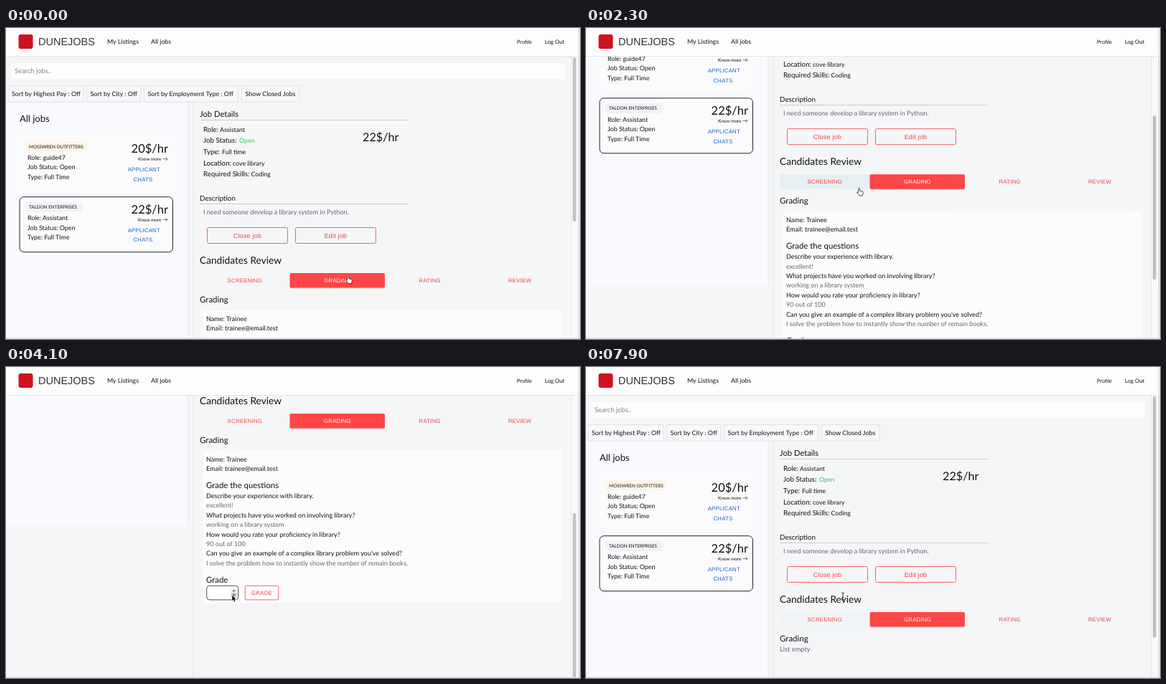
An HTML page for the animation above (8000 ms loop, 800 px wide and 434 px high).

```html
<!DOCTYPE html>
<html lang="en">
<head>
<meta charset="utf-8">
<title>Job board</title>
<style>
  html, body { margin: 0; width: 100%; height: 100%; overflow: hidden; background: #f5f6f8; }
  svg { display: block; width: 100vw; height: 100vh; }
  text { font-family: Lato, sans-serif; fill: #111; text-rendering: geometricPrecision; white-space: pre; }
  .ui { font-family: "Liberation Sans", Arial, sans-serif; letter-spacing: .0286em; text-anchor: middle; }
  .brand { font-family: "Liberation Sans", Arial, sans-serif; fill: #333; }
  .red { fill: #ef4040; }
  .blue { fill: #1866c0; }
  .white { fill: #fff; }
  .gray { fill: #5f656e; }
  .hint { fill: #7b8088; }
  .green { fill: #2fc45a; }
  .end { text-anchor: end; }
  .outline { fill: none; stroke: #f26464; }
  .rule { stroke: #c8cbce; }
  .edge { stroke: #e3e5e8; }
</style>
</head>
<body>
<svg id="stage" viewBox="0 0 800 434" preserveAspectRatio="none"></svg>
<script>
const text = (x, y, size, value, cls = "") =>
  `<text x="${x}" y="${y}" font-size="${size}" class="${cls}">${value}</text>`;
const rect = (x, y, w, h, attrs) =>
  `<rect x="${x}" y="${y}" width="${w}" height="${h}" ${attrs}/>`;
const line = (x1, y1, x2, y2, cls) =>
  `<line x1="${x1}" y1="${y1}" x2="${x2}" y2="${y2}" class="${cls}"/>`;

const filterBox = (x, w, label) =>
  rect(x, 80.5, w, 22.5, 'fill="#f7f8f9" stroke="#e1e3e6"') + text(x + 5, 95, 8.9, label);

const jobCard = (y, company, pillWidth, pillFill, role, pay, stroke) =>
  `<g transform="translate(0 ${y})">` +
  rect(19, 0.5, 213.5, 77, `rx="6" fill="#fbfbfc" stroke="${stroke}"`) +
  rect(26, 7.5, pillWidth, 14.5, `rx="7.2" fill="${pillFill}"`) +
  text(32, 17.1, 6.33, company) +
  text(226, 23.8, 16.5, pay, "end") +
  text(184, 34.5, 6.4, "Know more") +
  '<path d="M218.5 32.2h6.5m-2.3-2.2l2.3 2.2l-2.3 2.2" fill="none" stroke="#333" stroke-width=".7"/>' +
  text(30, 33.3, 8.8, "Role: " + role) +
  text(30, 46.8, 8.95, "Job Status: Open") +
  text(30, 60.2, 8.9, "Type: Full Time") +
  text(192.3, 49.5, 7.8, "APPLICANT", "ui blue") +
  text(191, 63.3, 7.8, "CHATS", "ui blue") + "</g>";

const detail = (y, label, valueX, value, cls) =>
  text(275, y, 9.75, label) + text(valueX, y, 8.8, value, cls);

const questions = [
  ["Describe your experience with library.", "excellent!"],
  ["What projects have you worked on involving library?", "working on a library system"],
  ["How would you rate your proficiency in library?", "90 out of 100"],
  ["Can you give an example of a complex library problem you've solved?",
   "I solve the problem how to instantly show the number of remain books."],
].flat();

const page =
  rect(0, 104, 254, 394, 'fill="#f8fafd"') +
  line(254, 104, 254, 498, "edge") + line(261, 104, 261, 800, "edge") +
  rect(7, 49, 772, 22, 'fill="#fcfdfd"') + text(12, 63, 9.3, "Search jobs..", "hint") +
  filterBox(3, 105, "Sort by Highest Pay : Off") +
  filterBox(112.5, 75, "Sort by City : Off") +
  filterBox(192.5, 131, "Sort by Employment Type : Off") +
  filterBox(328.5, 80.5, "Show Closed Jobs") +
  text(19, 131, 13, "All jobs") +
  jobCard(150.5, "MOSSWREN OUTFITTERS", 87, "#fdf4e6", "guide47", "20$/hr", "none") +
  jobCard(235.2, "TALDON ENTERPRISES", 82, "#eff2f6", "Assistant", "22$/hr", "#222") +

  text(270, 124.3, 11.2, "Job Details") + line(270, 128.5, 560, 128.5, "rule") +
  detail(144.7, "Role:", 298, "Assistant") +
  detail(160.2, "Job Status:", 325, "Open", "green") +
  detail(176, "Type:", 301, "Full time") +
  detail(191.6, "Location:", 316, "cove library") +
  detail(207.3, "Required Skills:", 341.5, "Coding") +
  text(497, 158.2, 16.2, "22$/hr") +
  text(270, 241, 9.8, "Description") + line(270, 245.5, 560, 245.5, "rule") +
  text(275, 260, 9.03, "I need someone develop a library system in Python.", "gray") +
  rect(280.5, 278.5, 112, 22, 'rx="2" class="outline"') + text(336.5, 292.8, 8.9, "Close job", "ui red") +
  rect(403.5, 278.5, 112, 22, 'rx="2" class="outline"') + text(459.5, 292.8, 8.9, "Edit job", "ui red") +
  text(270, 329, 13.7, "Candidates Review") +
  rect(270, 342, 126, 20.5, 'id="tabHover" rx="2" fill="#e6eff2"') +
  rect(396, 343.5, 132, 20.3, 'rx="2" fill="#000" opacity=".14"') +
  rect(395.5, 342, 132.5, 20.6, 'rx="2" fill="#fe4646"') +
  text(332.8, 355, 7.8, "SCREENING", "ui red") + text(462, 355, 7.8, "GRADING", "ui white") +
  text(590.7, 355, 7.8, "RATING", "ui red") + text(716, 355, 7.8, "REVIEW", "ui red") +
  text(270, 383.3, 11.5, "Grading") +

  '<g id="form">' +
  rect(274.5, 394, 500, 212, 'rx="4" fill="#fcfcfd"') +
  text(279, 408.5, 9.1, "Name: Trainee") + text(279, 422, 9.1, "Email: trainee@email.test") +
  text(279, 446, 11.4, "Grade the questions") +
  questions.map((q, i) => text(279, 460 + i * 13.4, 9.05, q, i % 2 ? "gray" : "")).join("") +
  text(279, 578, 11.4, "Grade") +
  rect(279.7, 582.3, 44, 19.6, 'id="field" rx="4" fill="#fff"') +
  text(313, 595.4, 8.9, "", "end value") +
  rect(313.2, 587, 0.8, 10, 'id="caret" fill="#111"') +
  '<g id="spinner">' + rect(313.8, 586, 7.6, 12.5, 'rx="1" fill="#ececec"') +
  rect(313.8, 592.3, 7.6, 6.2, 'id="spinDown" rx="1" fill="#c9c9c9"') +
  '<path d="M315.8 590.3l1.8-2.3l1.8 2.3zM315.8 594.4l1.8 2.3l1.8-2.3z" fill="#444"/></g>' +
  rect(333.2, 582.3, 46.6, 19.6, 'id="gradeHover" rx="2" fill="#fdecec"') +
  rect(333.2, 582.3, 46.6, 19.6, 'rx="2" class="outline"') +
  text(356.5, 594.9, 7.8, "GRADE", "ui red") + "</g>" +
  text(270, 397.3, 9.3, "List empty", "gray empty");

const header =
  rect(0, 0, 800, 39.5, 'fill="#fdfdfd"') + line(0, 39.5, 796, 39.5, "edge") +
  rect(17.5, 9, 20, 20, 'rx="3" fill="#d0121f"') +
  text(45, 24.3, 14.5, "DUNEJOBS", "brand") +
  text(141, 22.3, 8.85, "My Listings") + text(202, 22.3, 8.75, "All jobs") +
  text(712, 22, 7.4, "Profile") + text(751, 22, 7.75, "Log Out");

const pointers = {
  arrow: '<path d="M0 0v8.6l2-1.8l1.5 3.2l1.5-.7l-1.4-3.1h2.6z" fill="#000" stroke="#fff" stroke-width=".6"/>',
  hand: '<path d="M-.9 .9q.9-1.4 1.8 0v3.2l3.9 .9q1.2 .4 1 1.8l-.8 4.2h-4.4l-3.4-4.2q-.1-1.6 1.9-.2z" fill="#fff" stroke="#222" stroke-width=".8"/>',
  beam: '<path d="M-2-5q2 0 2 1.4q0-1.4 2-1.4M0-3.6v7.2M-2 5q2 0 2-1.4q0 1.4 2 1.4M-1.2 1.5h2.4" fill="none" stroke="#222" stroke-width=".9"/>',
};

const stage = document.getElementById("stage");
stage.innerHTML =
  rect(0, 0, 800, 434, 'fill="#f5f6f8"') + `<g id="page">${page}</g>` +
  rect(788, 40, 9, 394, 'fill="#fafafa"') + line(788, 40, 788, 434, "edge") +
  rect(790, 41, 4.6, 229, 'id="thumb" rx="2.3" fill="#c1c1c1"') + header +
  line(798.5, 0, 798.5, 434, "rule") + line(0, 433.3, 800, 433.3, "rule") +
  '<g id="pointer"></g>';

const el = id => document.getElementById(id);
const valueText = stage.querySelector(".value");
const emptyText = stage.querySelector(".empty");
const show = (node, on) => node.setAttribute("visibility", on ? "visible" : "hidden");

const LOOP = 8000, SUBMIT = 6900;
const scrollKeys = [[0, 0], [1750, 0], [2300, 137.5], [2700, 277], [SUBMIT - 1, 277],
  [SUBMIT, 66], [7250, 66], [7650, 0]];
const pointerKeys = [[0, 476.5, 345.5], [60, 476.5, 345.5], [350, 378, 218], [1700, 378, 218],
  [2300, 380.5, 223], [2500, 380.5, 223], [2900, 306, 134], [3200, 306, 150], [3900, 315, 318],
  [4100, 315, 318.3], [4250, 303, 315], [6300, 330, 318], [6550, 355, 315], [7200, 357, 318], [7700, 358, 320]];
const shapeKeys = [[0, "hand"], [150, "arrow"], [2200, "hand"], [2480, "arrow"], [2700, "beam"],
  [3500, "arrow"], [4200, "beam"], [5550, ""], [6350, "arrow"], [6480, "hand"], [SUBMIT, "arrow"],
  [7420, "hand"], [7600, "beam"]];
const hoverKeys = [[0, 0], [2130, 0], [2280, 1], [2480, 1], [2680, 0], [7400, 0], [7550, 1], [7700, 1], [7980, 0]];

// Eased interpolation of column `col` between neighbouring keys.
function sample(keys, t, col = 1, ease = u => u) {
  const i = keys.findIndex(k => k[0] > t);
  if (i < 0) return keys[keys.length - 1][col];
  const a = keys[i - 1], b = keys[i];
  return a[col] + (b[col] - a[col]) * ease((t - a[0]) / (b[0] - a[0]));
}
const smooth = u => u * u * (3 - 2 * u);
const latest = (keys, t) => keys.filter(k => k[0] <= t).pop()[1];

let shape;
function draw(now) {
  const t = now % LOOP;
  const scroll = sample(scrollKeys, t);
  const submitted = t >= SUBMIT;
  const focused = t >= 4300 && t < 6800;

  el("page").setAttribute("transform", `translate(0 ${-scroll})`);
  el("thumb").setAttribute("y", 41 + scroll * (submitted ? 55 / 66 : 163 / 277));
  el("thumb").setAttribute("height", submitted ? 337 : 229);
  el("tabHover").setAttribute("opacity", sample(hoverKeys, t));

  show(el("form"), !submitted);
  show(emptyText, submitted);
  el("field").setAttribute("stroke", focused ? "#1b5cad" : "#4a515b");
  el("field").setAttribute("stroke-width", focused ? 1.7 : 1);
  valueText.textContent = t < 5600 ? "" : t < 5800 ? "9" : "99";
  show(el("caret"), focused && (t - 4300) % 1000 < 500 || t >= 5600 && t < 6300);
  show(el("spinner"), !submitted && (t >= 3750 && t < 6800));
  show(el("spinDown"), t >= 3850 && t < 4180);
  show(el("gradeHover"), t >= 6480 && !submitted);

  const next = latest(shapeKeys, t);
  if (next !== shape) el("pointer").innerHTML = pointers[shape = next] || "";
  const x = sample(pointerKeys, t, 1, smooth), y = sample(pointerKeys, t, 2, smooth);
  el("pointer").setAttribute("transform", `translate(${x} ${y})`);
}

const start = performance.now();
function frame() {
  draw(performance.now() - start);
  requestAnimationFrame(frame);
}
frame();
</script>
</body>
</html>
```
